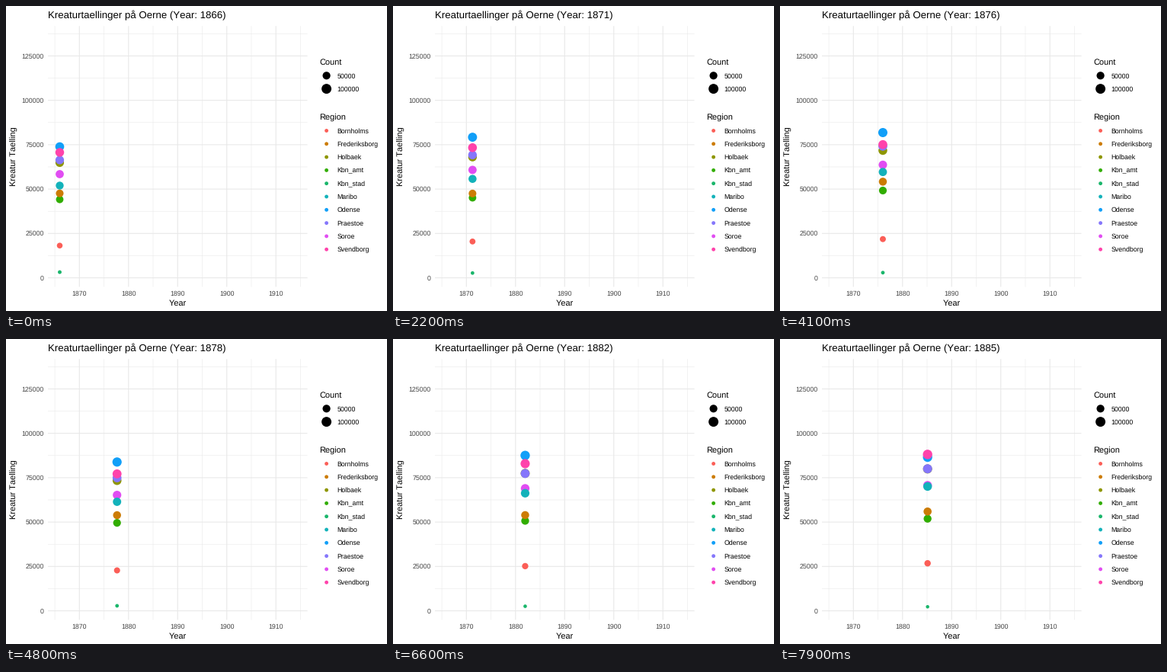
Recreate the animation shown at these times as a matplotlib script. Size 500x400 px, loop 8000 ms.

```python
import matplotlib.pyplot as plt
import numpy as np
from matplotlib.animation import FuncAnimation

W, H, DPI = 500, 400, 100
PT = 72 / DPI  # points per pixel
FRAMES, INTERVAL = 80, 100
LEFT, RIGHT, TOP, BOTTOM = 55, 395.5, 26.3, 368.3

# Unhinted text with linear advances and no kerning
plt.rcParams.update({
    "font.family": "Liberation Sans",
    "text.hinting": "none",
    "text.hinting_factor": 8,
    "text.kerning_factor": 6,
})

COLORS = {
    "Bornholms": "#fb5e57", "Frederiksborg": "#cc7c05", "Holbaek": "#8e9600",
    "Kbn_amt": "#31ad00", "Kbn_stad": "#1ab66b", "Maribo": "#13b2ba",
    "Odense": "#119ff8", "Praestoe": "#8576fb", "Soroe": "#e14df2",
    "Svendborg": "#ff43ab",
}

# Livestock in thousands per census, listed in drawing order
CENSUS = [1866, 1871, 1876, 1881, 1888]
STEPS = [0, 21, 41, 62, 91]  # animation step at which each census is reached
HERDS = {
    "Kbn_stad": [3.22, 2.70, 2.92, 2.66, 2.02],
    "Kbn_amt": [44.16, 44.89, 49.18, 50.34, 53.01],
    "Frederiksborg": [47.59, 47.16, 54.17, 53.31, 57.82],
    "Holbaek": [64.86, 67.83, 71.74, 76.68, 82.26],
    "Soroe": [58.42, 60.65, 63.66, 68.43, 72.29],
    "Praestoe": [66.37, 68.94, 74.10, 76.55, 82.48],
    "Bornholms": [18.17, 20.40, 21.82, 24.70, 28.26],
    "Maribo": [51.98, 55.54, 59.62, 65.08, 73.58],
    "Odense": [73.88, 79.08, 81.83, 87.84, 85.61],
    "Svendborg": [70.66, 73.24, 75.08, 81.31, 92.95],
}


def x_px(year):
    return 70.5 + (year - 1866) * 6.448


def y_px(thousands):
    return 356.5 - thousands * 58.2 / 25


def point_radius(size):
    return 0.375 * (size * 2.845 + 0.945) + 0.47


def herd_radius(thousands):
    share = np.clip((np.asarray(thousands) - 1.7) / 133.5, 0, 1)
    return point_radius(1 + 5 * np.sqrt(share))


def area(radius):
    return (2 * np.asarray(radius) * PT) ** 2


fig = plt.figure(figsize=(W / DPI, H / DPI), dpi=DPI, facecolor="white")
ax = fig.add_axes([0, 0, 1, 1])
ax.set_xlim(0, W)
ax.set_ylim(H, 0)
ax.axis("off")


def label(x, y, text, size=8.8, color="black", **kw):
    return ax.text(x, y, text, fontsize=size * PT, color=color,
                   va="baseline", **kw)


def grid(years, counts, width):
    style = dict(color="#e8e8e8", lw=width * PT, snap=False,
                 solid_capstyle="butt", zorder=1)
    for c in counts:
        ax.plot([LEFT, RIGHT], [y_px(c)] * 2, **style)
    for yr in years:
        ax.plot([x_px(yr)] * 2, [TOP, BOTTOM], **style)


def dots(x, y, radius, colors, z=3):
    return ax.scatter(x, y, s=area(radius), c=colors, linewidths=0, zorder=z)


# Panel and axes
grid(range(1865, 1920, 10), np.arange(12.5, 140, 25), 0.53)
grid(range(1870, 1920, 10), range(0, 150, 25), 1.07)
for count in range(0, 150, 25):
    label(50, y_px(count) + 3.1, str(count * 1000), color="#444444", ha="right")
for year in range(1870, 1920, 10):
    label(x_px(year), 380, str(year), color="#444444", ha="center")
label(225.2, 393, "Year", 11, ha="center")
label(14.2, 197.5, "Kreatur Taelling", 11, ha="center",
      rotation=90, rotation_mode="anchor")

# Legends
label(411.3, 77, "Count", 11)
sizes = [50, 100]
dots([420.6] * 2, [91.3, 108.6], herd_radius(sizes), ["black"] * 2)
for i, count in enumerate(sizes):
    label(434.4, 94.5 + 17.3 * i, str(count * 1000))

label(411.3, 149.3, "Region", 11)
rows = 163.5 + 17.3 * np.arange(len(COLORS))
dots([420.6] * len(rows), rows,
     np.full(len(rows), point_radius(1.5)), list(COLORS.values()))
for y, region in zip(rows, COLORS):
    label(434.4, y + 3.1, region)

# Moving parts
title = label(55, 16, "", 13.2)
points = dots([0] * len(HERDS), [0] * len(HERDS), np.ones(len(HERDS)),
              [COLORS[r] for r in HERDS], z=4)


def update(i):
    year = np.interp(i, STEPS, CENSUS)
    values = np.array([np.interp(year, CENSUS, h) for h in HERDS.values()])
    points.set_offsets(np.column_stack(
        [np.full(len(values), x_px(year)), y_px(values)]))
    points.set_sizes(area(herd_radius(values)))
    title.set_text(f"Kreaturtaellinger på Oerne (Year: {round(year)})")
    return points, title


anim = FuncAnimation(fig, update, frames=FRAMES, interval=INTERVAL,
                     repeat=True, repeat_delay=0)
plt.show()
```
